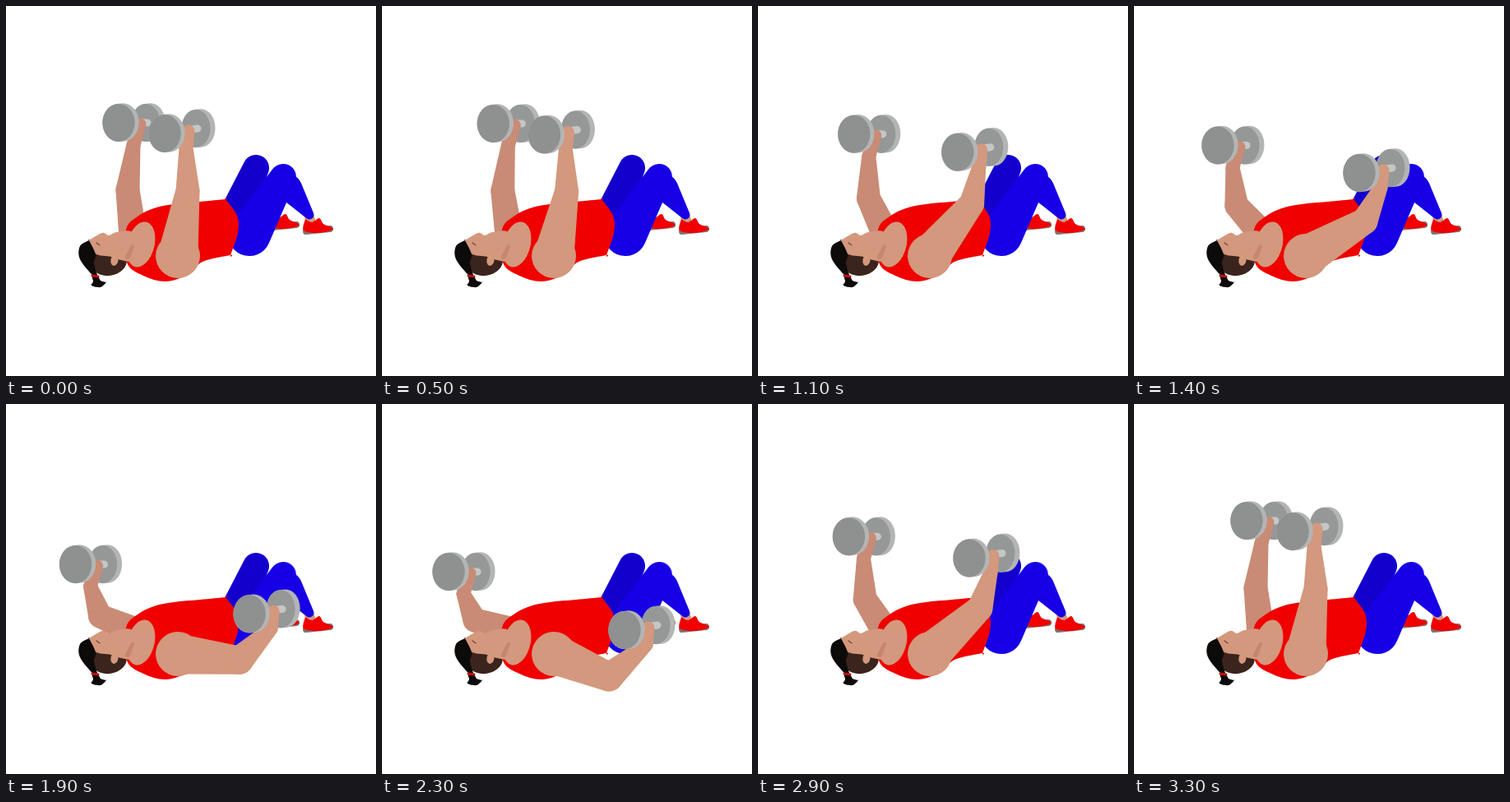
An HTML page with a canvas for the animation above (3.4 s loop, 450x450 px).

```html
<!DOCTYPE html>
<html lang="en">
<head>
<meta charset="utf-8">
<title>Dumbbell floor press</title>
<style>
html, body { margin: 0; width: 100%; height: 100%; overflow: hidden; background: #fff; }
canvas { display: block; width: 100vw; height: 100vh; }
</style>
</head>
<body>
<canvas id="stage"></canvas>
<script>
const SIZE = 450, LOOP = 3400, STEP = 100, LOW = 2300, HIGH = 3300;
const canvas = document.getElementById('stage');
const ctx = canvas.getContext('2d');
const ratio = window.devicePixelRatio || 1;
canvas.width = canvas.height = SIZE * ratio;

const SKIN = '#d3987d', SKIN_FAR = '#c98b75', RED = '#f00000', BLUE = '#1700e6', NAVY = '#1400cd';
const HAIR = '#0d0a0a', BROWN = '#3b241d', STEEL = '#b3b5b4';

// Elbow and front plate travel from raised to lowered along a bowed path;
// wrist, fist and rear plate keep their offsets from the front plate.
const NEAR = {
  skin: SKIN, shoulder: [209, 304], size: 27, upper: 24.5, swell: 3,
  elbow: { from: [221, 225], to: [276, 332], bow: [132, -60] },
  plate: { from: [193, 155], to: [295, 275], bow: [127, -40] },
  wrist: [26, 18], fist: [29, -3], rear: [40, -6]
};
const FAR = {
  skin: SKIN_FAR, shoulder: [154, 275], size: 17, upper: 17, swell: 0,
  elbow: { from: [148, 224], to: [113, 263], bow: [-25, 0] },
  plate: { from: [137, 142], to: [81, 204], bow: [-32, -10] },
  wrist: [18, 27], fist: [26, 2], rear: [35, 0]
};

const ease = u => (1 - Math.cos(Math.PI * u)) / 2;

// 0 is raised, 1 is lowered: a slow descent and a quicker press
function depth(t) {
  return t < LOW ? ease(t / LOW) ** 1.8 : ease(Math.max(0, (HIGH - t) / (HIGH - LOW)));
}

const along = (path, u) =>
  path.from.map((a, i) => a + (path.to[i] - a) * u + path.bow[i] * u * (1 - u));
const add = (p, q) => [p[0] + q[0], p[1] + q[1]];

function fill(color) {
  ctx.fillStyle = color;
  ctx.fill();
}

// Closed smooth curve; a repeated point makes a corner
function blob(color, ...n) {
  const count = n.length / 2;
  const at = i => { const k = (i + count) % count * 2; return [n[k], n[k + 1]]; };
  ctx.beginPath();
  ctx.moveTo(n[0], n[1]);
  for (let i = 0; i < count; i++) {
    const a = at(i - 1), b = at(i), c = at(i + 1), d = at(i + 2);
    ctx.bezierCurveTo(b[0] + (c[0] - a[0]) / 6, b[1] + (c[1] - a[1]) / 6,
      c[0] - (d[0] - b[0]) / 6, c[1] - (d[1] - b[1]) / 6, c[0], c[1]);
  }
  fill(color);
}

function oval(color, x, y, rx, ry, tilt = 0) {
  ctx.beginPath();
  ctx.ellipse(x, y, rx, ry, tilt, 0, Math.PI * 2);
  fill(color);
}

// Hull of two circles
function limb(color, [x0, y0], r0, [x1, y1], r1) {
  const dir = Math.atan2(y1 - y0, x1 - x0);
  const open = Math.acos(Math.max(-1, Math.min(1, (r0 - r1) / Math.hypot(x1 - x0, y1 - y0))));
  ctx.beginPath();
  ctx.arc(x0, y0, r0, dir + open, dir - open + Math.PI * 2);
  ctx.arc(x1, y1, r1, dir - open, dir + open);
  fill(color);
}

function plate(x, y, width, rim, face) {
  ctx.beginPath();
  ctx.ellipse(x, y, width, 23.3, 0, Math.PI / 2, Math.PI * 1.5);
  ctx.ellipse(x + rim, y - 0.5, width, 23.3, 0, -Math.PI / 2, Math.PI / 2);
  fill(STEEL);
  oval(face, x, y, width, 23);
}

function arm(a, u) {
  const elbow = along(a.elbow, u), front = along(a.plate, u);
  const wrist = add(front, a.wrist), fist = add(front, a.fist), rear = add(front, a.rear);
  const bend = 14.5 + a.swell * u;
  plate(rear[0] - 2, rear[1], 17.5, 6, '#969797');
  limb('#c3c7c6', rear, 4.5, front, 4.5);
  oval(a.skin, ...a.shoulder, a.size, a.size);
  limb(a.skin, a.shoulder, a.upper, elbow, bend);
  limb(a.skin, elbow, bend, wrist, 8.5);
  limb(a.skin, wrist, 8.5, fist, 7.5);
  plate(...front, 19.7, 5, '#8f9090');
}

function shoe(x, y) {
  ctx.save();
  ctx.translate(x, y);
  limb('#7d7472', [4, 15], 4, [33, 12], 4);
  blob(RED, 1,14, 3,0, 3,0, 11,4, 20,-1, 25,6, 36,11, 34,14, 18,17);
  ctx.restore();
}

function legs() {
  limb(NAVY, [275, 262], 20, [304, 197], 16);
  shoe(320, 254);
  limb(SKIN, [367, 252], 6, [371, 260], 5);
  shoe(361, 259);
  limb(BLUE, [296, 278], 26, [337, 208], 16);
  limb(BLUE, [344, 221], 16, [369, 254], 5.5);
}

function torso() {
  blob(RED, 146,272, 160,256, 180,246, 204,241, 236,238, 267,235, 267,235, 281,255, 282,276,
    273,303, 273,303, 239,311, 220,327, 194,335, 167,328, 147,312);
}

function head() {
  oval(BROWN, 125, 311, 22, 17, -0.15);
  oval(SKIN, 164, 290, 16.5, 28, 0.25);
  blob(SKIN, 101,285, 101,285, 117,276, 125,279, 135,275, 154,276, 154,308, 140,309, 128,305, 108,301);
  oval(SKIN, 132, 309, 4.5, 7, 0.2);
  limb('#c58770', [154, 292], 2, [148, 305], 3);
  blob(HAIR, 101,285, 101,285, 90,292, 90,308, 106,328, 111,327, 111,327, 107,313, 109,302);
  blob(HAIR, 105,329, 112,329, 115,334, 122,336, 122,336, 115,342, 104,340, 106,335);
  limb('#c40d12', [105, 328], 1.5, [112, 329], 1.5);
  limb('#6d4237', [110, 288], 0.6, [114, 291], 0.5);
}

function draw(now) {
  const t = Math.floor((now % LOOP) / STEP) * STEP;
  const u = depth(t);
  ctx.setTransform(ratio, 0, 0, ratio, 0, 0);
  ctx.fillStyle = '#fff';
  ctx.fillRect(0, 0, SIZE, SIZE);
  legs();
  arm(FAR, u);
  torso();
  head();
  arm(NEAR, u);
}

const start = performance.now();
function tick() {
  draw(performance.now() - start);
  requestAnimationFrame(tick);
}
tick();
</script>
</body>
</html>
```
